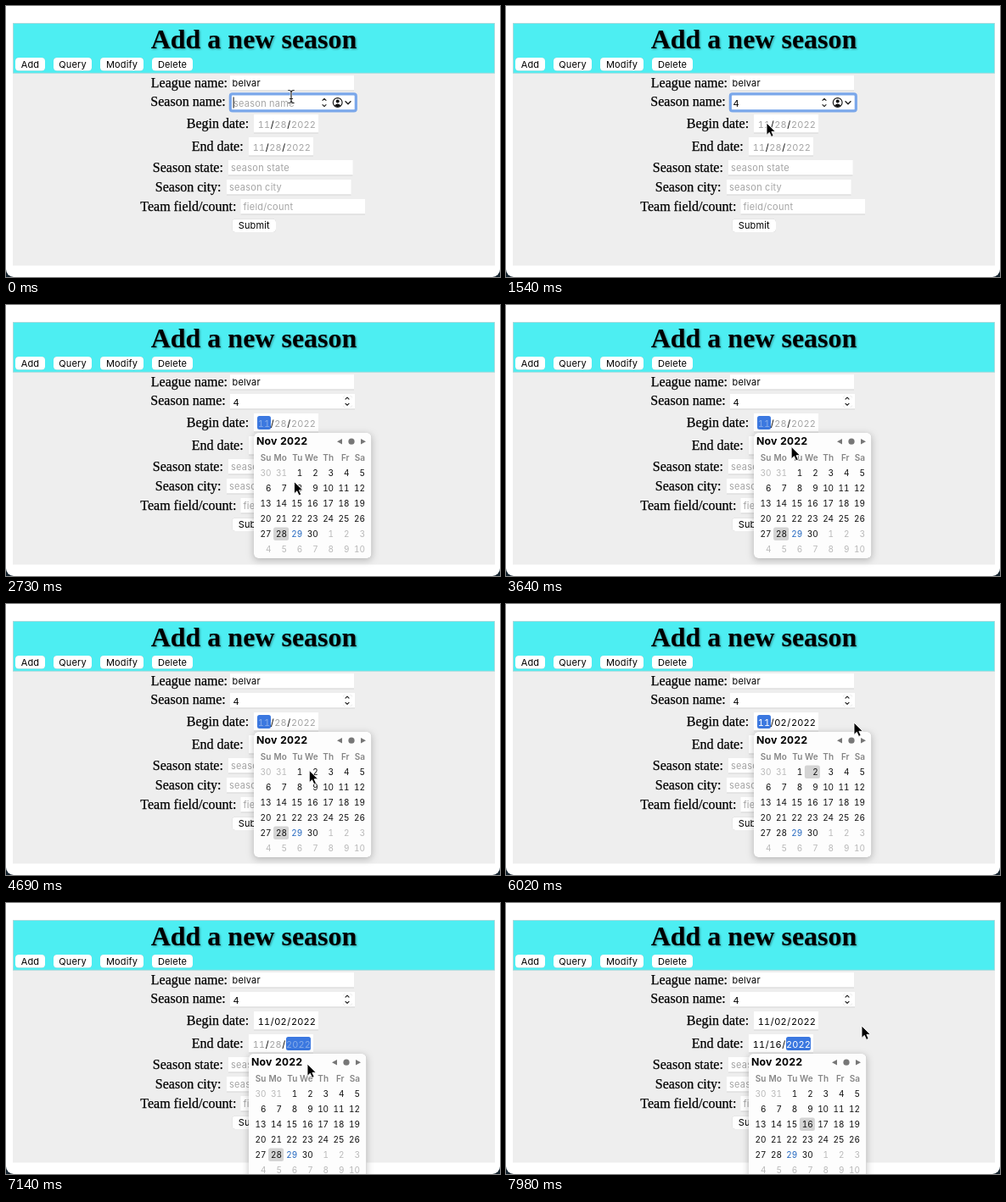
Animation of 582 by 320 pixels, one loop 8 s. Source, as an HTML page:

```html
<!DOCTYPE html>
<html lang="en">
<head>
<meta charset="utf-8">
<title>Add a new season</title>
<style>
  html, body { margin: 0; width: 100%; height: 100%; overflow: hidden; }
  svg {
    display: block; width: 582px; height: 320px; background: #14232e;
    font: 11px Inter, sans-serif; font-variant-numeric: tabular-nums; letter-spacing: .15px;
  }
  .label { font: 16px "Liberation Serif", serif; letter-spacing: 0; stroke: #000; stroke-width: .25px; }
  .title {
    font: bold 32px "Liberation Serif", serif; letter-spacing: 0;
    filter: drop-shadow(1px 1px 1px rgba(0, 0, 0, .4));
  }
  .soft { fill: #a5a5a5; letter-spacing: .25px; }
  .mid { text-anchor: middle; }
  .day { font-size: 10px; text-anchor: end; letter-spacing: 0; }
  .button { filter: drop-shadow(0 .5px .7px rgba(0, 0, 0, .3)); }
  .popup { filter: drop-shadow(0 0 .5px rgba(0, 0, 0, .35)) drop-shadow(0 2px 4px rgba(0, 0, 0, .25)); }
  .line { fill: none; stroke: #222; stroke-linecap: round; stroke-linejoin: round; }
</style>
</head>
<body>
<svg viewBox="0 0 582 320"></svg>
<script>
const LOOP = 8000, STEP = 70;
const svg = document.querySelector('svg');

// Event times in ms
const CARET_OFF = 210, TYPED = 770, TYPED_CARET_OFF = 1400;
const BEGIN_OPEN = 1890, BEGIN_PICK = 4830, BEGIN_CLOSE = 6230;
const END_OPEN = 6930, END_PICK = 7560;

// Pointer path: time, x, y
const path = [
  [0, 336, 107], [350, 354, 109], [490, 354, 109], [560, 357, 109], [630, 357, 109],
  [980, 352, 136], [1260, 352, 136], [1540, 307, 138], [2240, 307, 138],
  [2730, 339.5, 208.5], [2870, 346, 208], [2940, 346, 208], [3400, 332, 184], [3780, 338, 160],
  [4060, 386, 141], [4340, 334, 211], [4620, 357.3, 196.5], [5110, 357.3, 196.5], [5460, 353, 210],
  [5950, 405, 146], [6020, 410, 140], [6300, 416, 141], [6720, 345, 163], [6930, 345, 163],
  [7140, 355, 190], [7490, 355, 260], [7630, 355, 260], [7980, 419, 145]
];

function pointerAt(t) {
  const i = path.findIndex(p => p[0] > t);
  if (i < 0) return path.at(-1).slice(1);
  const [t0, x0, y0] = path[i - 1], [t1, x1, y1] = path[i];
  const u = (t - t0) / (t1 - t0), k = u * u * (3 - 2 * u);
  return [x0 + (x1 - x0) * k, y0 + (y1 - y0) * k];
}

const rect = (x, y, w, h, fill, more = '') =>
  `<rect x="${x}" y="${y}" width="${w}" height="${h}" fill="${fill}" ${more}/>`;
const text = (x, y, s, cls = '', more = '') =>
  `<text x="${x}" y="${y}" class="${cls}" ${more}>${s}</text>`;
const line = (d, width = 1.2) => `<path class="line" d="${d}" stroke-width="${width}"/>`;
const group = (x, y, s, cls = '') => `<g class="${cls}" transform="translate(${x} ${y})">${s}</g>`;

const button = (x, y, w, s) =>
  rect(x, y, w, 15.5, '#fff', 'rx="4" class="button"') + text(x + w / 2, y + 11.8, s, 'mid');

const input = (x, y, w, h = 18.5) =>
  rect(x, y, w, h, '#fff') + rect(x, y + h - 1, w, 1, '#d0d0d0');

const stepper = (x, y) =>
  line(`M${x - 2} ${y - 2.6}l2-2l2 2M${x - 2} ${y + 2.6}l2 2l2-2`);

function dateField(day, picked, active) {
  const parts = [['11', 304, 16], [day, 323.5, 16], ['2022', 350.5, 29]];
  const slashes = text(313.7, 143.7, '/', 'mid') + text(333.2, 143.7, '/', 'mid');
  return input(292, 128, 76, 22.5) + slashes + parts.map(([s, x, w], i) => {
    const on = i === active;
    const color = picked ? (on ? '#fff' : '#000') : (on ? '#85abe9' : '#a5a5a5');
    return (on ? rect(x - w / 2, 131, w, 16, '#3b78e0', 'rx="2.5"') : '') +
      text(x, 143.7, s, 'mid', `fill="${color}"`);
  }).join('');
}

function calendar(selected) {
  const right = i => 312.5 + 18.4 * (i % 7);
  let s = rect(292, 151, 138.5, 148, '#fdfdfd', 'rx="5" class="popup"') +
    text(295, 165.3, 'Nov 2022', '', 'font-size="12.3" font-weight="700"') +
    '<path d="M396 158v6.4l-6-3.2zM418 158v6.4l6-3.2z" fill="#777"/><circle cx="407" cy="161.2" r="3.6" fill="#777"/>';
  ['Su', 'Mo', 'Tu', 'We', 'Th', 'Fr', 'Sa'].forEach((name, i) => {
    s += text(right(i), 184.3, name, 'day', 'fill="#858585" font-weight="600"');
  });
  for (let i = 0; i < 42; i++) {
    const n = i - 1, inside = n > 0 && n <= 30, y = 198 + 18 * Math.floor(i / 7);
    const label = n < 1 ? n + 31 : n > 30 ? n - 30 : n;
    const color = !inside ? '#b9b9b9' : n === 29 ? '#2468c0' : '#111';
    if (n === selected) s += rect(right(i) - 15.8, y - 7.5, 18, 15.5, '#d4d4d4', 'rx="2.5"');
    s += text(right(i), y + 4, label, 'day', `fill="${color}"`);
  }
  return s;
}

function seasonInput(t) {
  const focused = t < BEGIN_OPEN, typed = t >= TYPED;
  let s = input(264, 105, 147);
  if (focused) {
    s += rect(264.3, 103.9, 148, 20, '#fff', 'rx="2.5" stroke="#7aa7ea" stroke-width="3.2"') +
      stepper(375, 114) +
      '<circle cx="390.7" cy="114" r="5.4" fill="none" stroke="#111" stroke-width="1.1"/>' +
      '<circle cx="390.7" cy="112.4" r="2" fill="#111"/><path d="M387 117.4q3.7-4 7.4 0q-3.7 3-7.4 0" fill="#111"/>' +
      line('M400 112.7l3 3l3-3', 1.5);
  } else {
    s += rect(397, 107, 11, 14, '#fff', 'rx="3.5" class="button"') + stepper(402, 113.7);
  }
  s += typed ? text(267.6, 118.5, '4') : text(268, 118.5, 'season name', 'soft');
  if (t < CARET_OFF) s += rect(267.6, 107.5, 1, 13, '#111');
  if (typed && t < TYPED_CARET_OFF) s += rect(274.9, 107.5, 1, 13, '#111');
  return s;
}

const arrow = '<path d="M0 0V14.4L3.3 11.3L5.6 16.4L8.2 15.3L5.9 10.3H10.4Z" fill="#000" stroke="#fff" stroke-width=".9"/>';
const beamPath = 'M-3.2-7.5Q0-7.5 0-5Q0-7.5 3.2-7.5M0-5V5M-3.2 7.5Q0 7.5 0 5Q0 7.5 3.2 7.5M-1.6 2.5H1.6';
const beam = `<path d="${beamPath}" fill="none" stroke="#fff" stroke-width="2.4"/>` + line(beamPath);

const fixed = rect(0, -20, 582, 340, '#fff', 'rx="9"') +
  rect(8, 79, 568, 227.5, '#eee') +
  rect(8.4, 20.6, 567.2, 58.6, '#4deef2', 'stroke="#a5d5d6" stroke-width=".8"') +
  text(292, 50, 'Add a new season', 'title mid') +
  button(11, 61, 35, 'Add') + button(56, 61, 45, 'Query') +
  button(111, 61, 51, 'Modify') + button(172, 61, 48, 'Delete') + button(266.5, 251.5, 51.5, 'Submit') +
  [
    [170.8, 96, 'League name:'], [170.3, 118, 'Season name:'], [212.8, 144, 'Begin date:'],
    [218.8, 171, 'End date:'], [172.8, 196, 'Season state:'], [175.8, 219, 'Season city:'],
    [158.3, 242, 'Team field/count:']
  ].map(([x, y, s]) => text(x, y, s, 'label')).join('') +
  input(264, 82, 146) + text(266.5, 95, 'belvar') +
  [[262, 182, 'season state'], [260, 205, 'season city'], [276.5, 228, 'field/count']]
    .map(([x, y, s]) => input(x, y, 146.5) + text(x + 3, y + 13.4, s, 'soft')).join('');

function scene(t) {
  const beginOpen = t >= BEGIN_OPEN && t < BEGIN_CLOSE, endOpen = t >= END_OPEN;
  const beginPicked = t >= BEGIN_PICK, endPicked = t >= END_PICK;
  return fixed + seasonInput(t) +
    dateField(beginPicked ? '02' : '28', beginPicked, beginOpen ? 0 : -1) +
    group(-6, 27, dateField(endPicked ? '16' : '28', endPicked, endOpen ? 2 : -1)) +
    (beginOpen ? calendar(beginPicked ? 2 : 28) : '') +
    (endOpen ? group(-6, 27, calendar(endPicked ? 16 : 28)) : '') +
    group(...pointerAt(t), t < 700 ? beam : arrow);
}

let shown = -1;
function tick() {
  const t = Math.floor(performance.now() % LOOP / STEP) * STEP;
  if (t !== shown) svg.innerHTML = scene(shown = t);
  requestAnimationFrame(tick);
}
tick();
</script>
</body>
</html>
```
